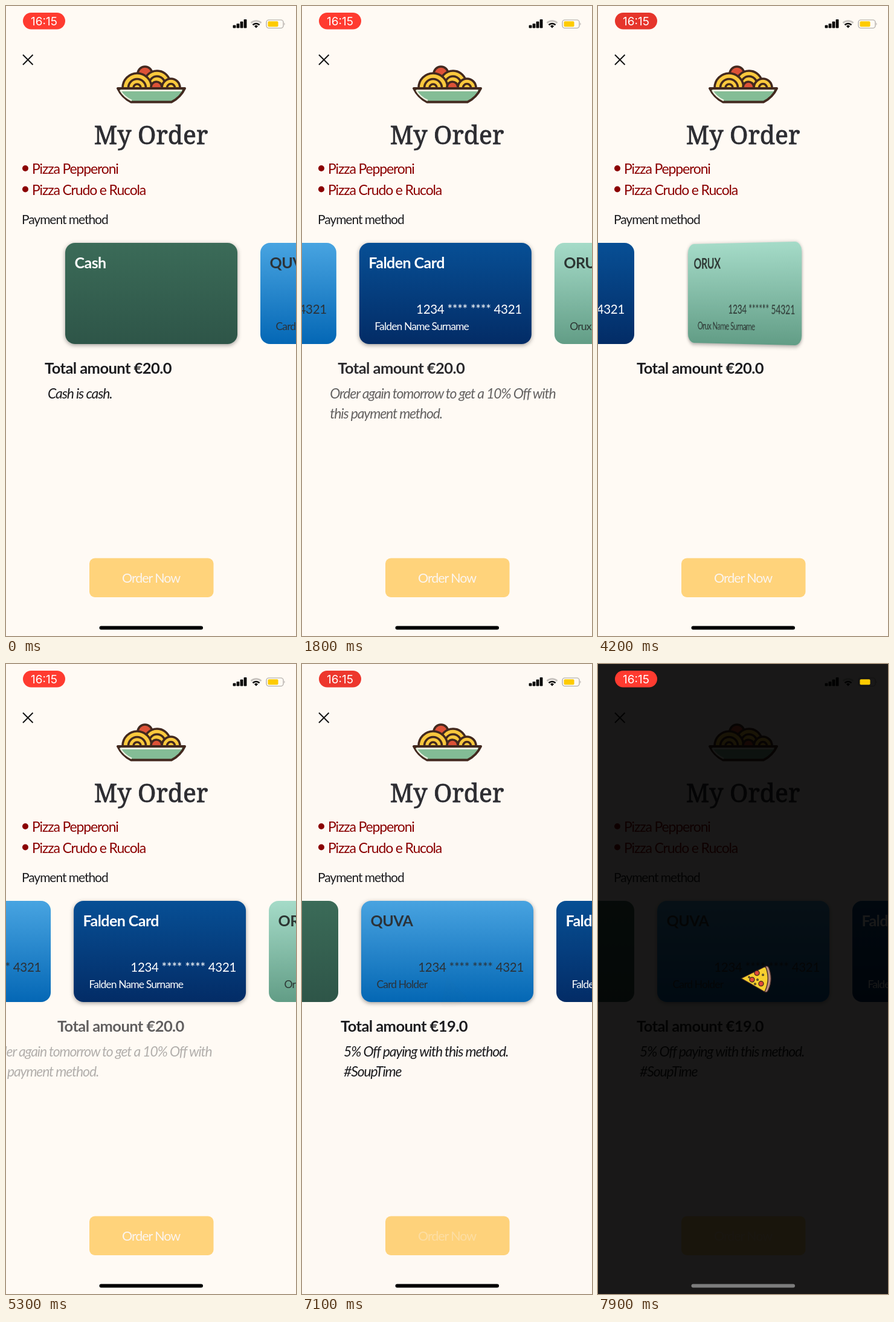
These frames come from a looping animation (480 by 1040 pixels, 8000 ms). An HTML page:

```html
<!DOCTYPE html>
<html lang="en">
<head>
<meta charset="utf-8">
<title>My Order</title>
<style>
  html, body { margin: 0; width: 100%; height: 100%; overflow: hidden; background: #fffaf4; }
  #stage { position: absolute; left: 0; top: 0; width: 480px; height: 1040px; overflow: hidden; background: #fffaf4; }
  #stage > svg { position: absolute; left: 0; top: 0; }
  text { font-family: Lato, "Open Sans", sans-serif; letter-spacing: -.05em; fill: #1c1c1f; white-space: pre; }
  .bold { font-weight: 700; letter-spacing: -.022em; }
  .number { letter-spacing: -.015em; }
  .desc { font-style: italic; }
  .items text { fill: #8b0000; }
  .title { font: 41px "Noto Serif", serif; letter-spacing: 0; fill: #2d2d32; stroke: #2d2d32; stroke-width: .8px; }
  .clock { font: 19px Inter, sans-serif; letter-spacing: 0; fill: #fff; }
  .card { position: absolute; left: 97.5px; top: 391px; width: 285px; height: 166.5px; border-radius: 16px; }
  .card svg { position: absolute; left: 0; top: 0; }
</style>
</head>
<body>
<div id="stage">
  <svg id="base" width="480" height="1040">
    <path d="M376 32h4v4h-4zM382 29.500h4v6.500h-4zM388 26h4v10h-4zM394 22.500h4v13.500h-4z" stroke="#000" stroke-width=".8" stroke-linejoin="round"/>
    <g fill="none" stroke-width="2.600">
      <path d="M405.500 28A12.500 12.500 0 0 1 422.500 28" stroke="#c5c1bd"/>
      <path d="M408.500 31.200A8 8 0 0 1 419.500 31.200" stroke="#000"/>
    </g>
    <path d="M414 36.500l-3-3.200a4.300 4.300 0 0 1 6 0z"/>
    <rect x="431" y="23" width="28" height="13.500" rx="4" fill="none" stroke="#a8a4a0" stroke-width="1.200"/>
    <path d="M460.500 27.500q2 2.200 0 4.500z" fill="#a8a4a0"/>
    <path d="M28 80.500l16.500 16.500M44.500 80.500l-16.500 16.500" stroke="#141414" stroke-width="2"/>

    <clipPath id="above"><rect x="180" y="90" width="122" height="46"/></clipPath>
    <g id="pasta" clip-path="url(#above)" stroke="#43291f" stroke-width="3.600"></g>
    <path d="M185 136H296Q289 151 274 158.500H207Q192 151 185 136Z" fill="#84bd96" stroke="#43291f" stroke-width="4" stroke-linejoin="round"/>
    <path d="M190 139.500H291" stroke="#e9f0df" stroke-width="3"/>
    <path d="M189 139q6 11 19 17" fill="none" stroke="#e9f0df" stroke-width="2.500"/>

    <text class="title" x="240" y="228" text-anchor="middle">My Order</text>
    <g class="items" fill="#8b0000" font-size="23">
      <circle cx="32" cy="268" r="5"/><circle cx="32" cy="302.500" r="5"/>
      <text x="43" y="277">Pizza Pepperoni</text>
      <text x="43" y="311.500">Pizza Crudo e Rucola</text>
    </g>
    <text x="26" y="360" font-size="21">Payment method</text>
    <g id="info"></g>
    <rect x="138" y="911.500" width="205.500" height="64.500" rx="9" fill="#ffd37b"/>
    <text id="order" x="240" y="952" font-size="21.500" text-anchor="middle" style="fill:#fbf5f0">Order Now</text>
  </svg>

  <div id="cards"></div>

  <svg id="top" width="480" height="1040">
    <rect id="shade" width="480" height="1040"/>
    <rect x="433.500" y="25.300" width="17" height="9" rx="1.800" fill="#fecb00"/>
    <rect id="pill" x="28" y="11" width="70" height="27.500" rx="13.700"/>
    <text class="clock" x="63" y="31.500" text-anchor="middle">16:15</text>
    <rect id="home" x="154.500" y="1023.500" width="171.500" height="6" rx="3"/>
    <g id="slice" stroke="#3b2420" stroke-width="1.300" stroke-linejoin="round">
      <path d="M37 -21Q41 -23 43 -18Q50 1 42 18Q40 23 36 21Z" fill="#b98d80"/>
      <path d="M-3 -1L37 -21Q46 0 36 21Z" fill="#f6cf2f"/>
      <g fill="#e04a3a">
        <circle cx="23" cy="-10" r="4"/><circle cx="15" cy="1" r="4"/><circle cx="30" cy="7.500" r="4"/>
      </g>
      <g fill="#7a8f3a" stroke-width="1">
        <circle cx="33" cy="-7" r="1.400"/><circle cx="24" cy="1" r="1.400"/><circle cx="20" cy="8" r="1.400"/><circle cx="10" cy="-3" r="1.200"/>
      </g>
    </g>
  </svg>
</div>

<script>
const LOOP = 8000, CARD_STEP = 323, PAGE_STEP = 480;
const $ = id => document.getElementById(id);

const pages = [
  { name: 'Cash', colors: ['#3b6b58', '#2e5548'], ink: '#fff', total: '20.0', note: ['Cash is cash.'] },
  { name: 'QUVA', colors: ['#48a4e1', '#0467b5'], ink: '#2c3238', total: '19.0', number: '1234 **** **** 4321',
    holder: 'Card Holder', note: ['5% Off paying with this method.', '#SoupTime'] },
  { name: 'Falden Card', colors: ['#074f95', '#032c66'], ink: '#fff', total: '20.0', number: '1234 **** **** 4321',
    holder: 'Falden Name Surname', note: ['Order again tomorrow to get a 10% Off with', 'this payment method.'] },
  { name: 'ORUX', colors: ['#a5dbc8', '#629d86'], ink: '#2c3532', total: '20.0', number: '1234 ****** 54321',
    holder: 'Orux Name Surname', note: [] }
];

// start, duration, value moved to
const swipes = [[100, 700, 1], [930, 700, 2], [1761, 700, 3], [4510, 680, 2], [5216, 700, 1]];
const flips = [[3200, 500, 180], [3875, 500, 0]];
const pulse = [[0, 1], [1800, 1], [3100, .91], [4200, .9], [5300, 1], [7100, .93], [7900, 1]];
const press = [[6850, 1], [7000, .35]];

const clamp = v => Math.max(0, Math.min(1, v));
const glide = u => 1 - (1 - u * u) ** 3;
const swing = u => .5 - .5 * Math.cos(Math.PI * u);

function follow(moves, t, ease) {
  return moves.reduce((v, [start, dur, to]) => v + (to - v) * ease(clamp((t - start) / dur)), 0);
}

function track(keys, t) {
  let v = keys[0][1];
  for (let i = 1; i < keys.length; i++) {
    const [a] = keys[i - 1], [b, to] = keys[i];
    v += (to - v) * clamp((t - a) / (b - a));
  }
  return v;
}

function label(x, y, size, str, more = '') {
  return `<text x="${x}" y="${y}" font-size="${size}" ${more}>${str}</text>`;
}

function rings(x, y, radii, fill = '#fbc93d') {
  return radii.map(r => `<circle cx="${x}" cy="${y}" r="${r}" fill="${fill}"/>`).join('');
}

$('pasta').innerHTML = rings(230, 112, [12], '#dd5237') + rings(250, 129, [22, 13]) +
  rings(217, 135, [24, 14.5, 6]) + rings(273, 135, [15, 6.5]) + rings(249, 134, [9], '#dd5237');

for (const p of pages) {
  const fill = `style="fill:${p.ink}"`;
  const card = document.createElement('div');
  card.className = 'card';
  card.style.background = `linear-gradient(${p.colors})`;
  card.innerHTML = '<svg width="285" height="166">' +
    label(15.5, 42, 25, p.name, `class="bold" ${fill}`) +
    (p.number ? label(269, 117, 20.5, p.number, `class="number" text-anchor="end" ${fill}`) +
      label(25.5, 144, 17.5, p.holder, fill) : '') +
    '</svg>';
  $('cards').append(card);
  p.card = card;

  const group = () => $('info').appendChild(document.createElementNS('http://www.w3.org/2000/svg', 'g'));
  p.sum = group();
  p.sum.innerHTML = label(64, 607, 25.5, `Total amount €${p.total}`, 'class="bold"');
  p.text = group();
  p.text.innerHTML = p.note.map((s, i) => label(69, 648 + i * 33, 23, s, 'class="desc"')).join('');
}

function place(node, x, alpha) {
  node.setAttribute('transform', `translate(${x} 0)`);
  node.setAttribute('opacity', clamp(alpha));
}

function draw(t) {
  const page = follow(swipes, t, glide);
  const angle = follow(flips, t, swing);

  pages.forEach((p, i) => {
    const d = i - page, off = Math.abs(d);
    const turn = i === 3 ? angle : 0;
    const spin = turn ? `perspective(4000px) rotateY(${-turn}deg)` : '';
    p.card.style.transform = `translateX(${d * CARD_STEP}px) ${spin}`;
    p.card.style.boxShadow = `0 2px 7px rgba(0,0,0,${.38 * clamp(1 - off)})`;
    p.card.firstChild.style.opacity = turn > 90 ? 0 : 1;
    place(p.sum, d * PAGE_STEP, 1 - 7 * off);
    place(p.text, -2330 * off, 1 - 3.2 * Math.sqrt(off));
  });

  const dim = glide(clamp((t - 7080) / 500));
  $('shade').setAttribute('opacity', .9 * dim);
  const gray = Math.round(125 * dim);
  $('home').setAttribute('fill', `rgb(${gray},${gray},${gray})`);
  $('slice').setAttribute('opacity', dim);
  $('slice').setAttribute('transform', `translate(240 520) rotate(${(t - 7900) * .36})`);
  $('order').setAttribute('opacity', track(press, t));
  const k = track(pulse, t);
  $('pill').setAttribute('fill', `rgb(${255 * k},${59 * k},${48 * k})`);
}

const begin = performance.now();
function tick() {
  draw((performance.now() - begin) % LOOP);
  requestAnimationFrame(tick);
}
tick();
</script>
</body>
</html>
```
